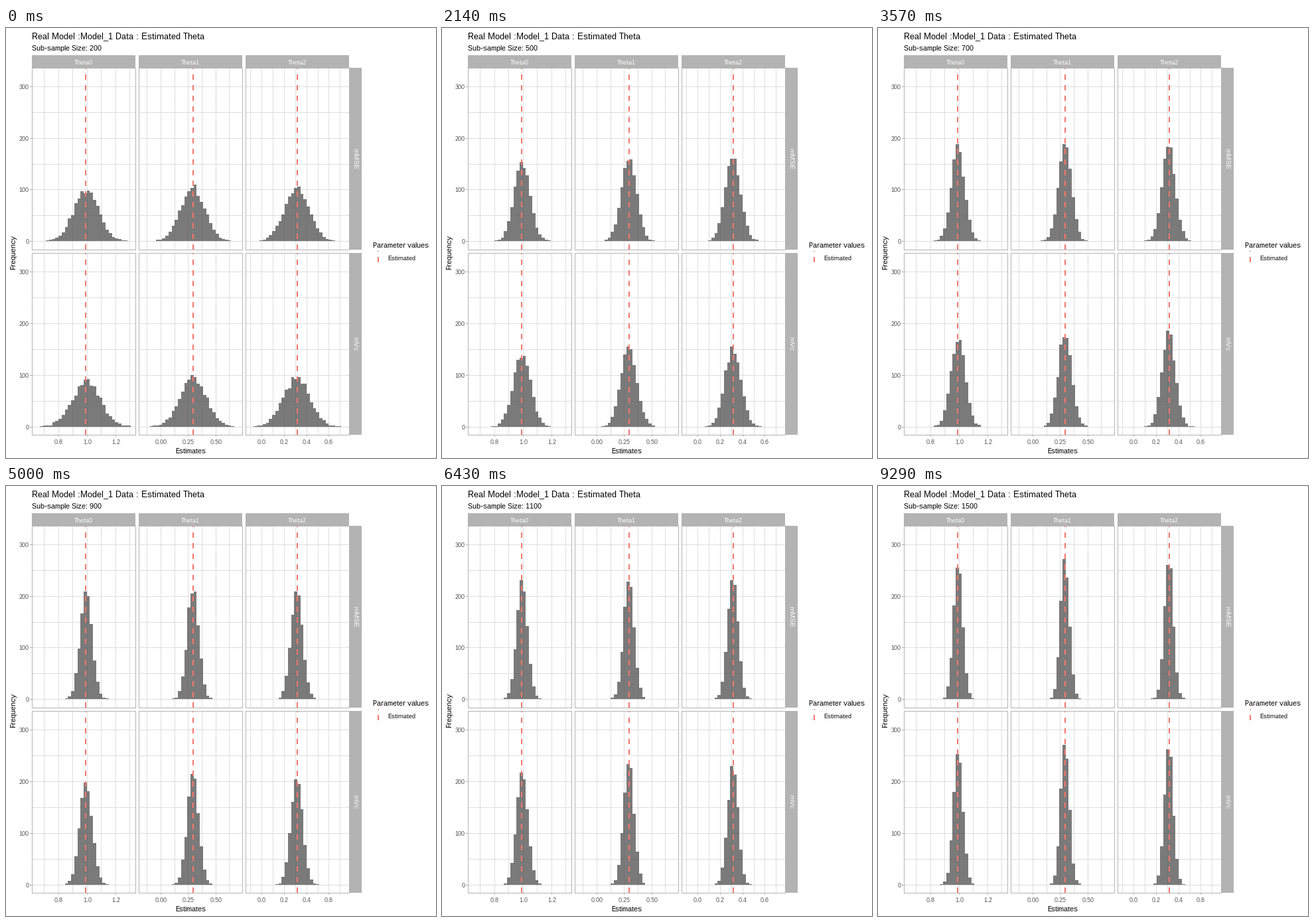
A matplotlib script for the animation above (10 s loop, 648 px wide and 648 px high).

```python
import numpy as np
import matplotlib.pyplot as plt
from matplotlib.animation import FuncAnimation
from matplotlib.collections import PolyCollection

W = H = 648
LOOP, STEP = 10000, 50          # ms
FRAMES = LOOP // STEP
STAGES = 14                     # sample sizes 200, 300 ... 1500

plt.rcParams.update({
    "font.family": "Liberation Sans",
    "text.hinting": "native",   # whole-pixel glyphs, as on a screen device
    "text.hinting_factor": 1,
})
STRIP, GRID, BAR, DASH = "#B3B3B3", "#DEDEDE", "#595959", "#F8766D"
TICK_TEXT = "#4D4D4D"

COLS = [39, 200, 361]           # left edge of each panel
ROWS = [60, 339]                # top edge of each panel
PW, PH = 157, 275
ZERO = [321.6, 601.05]          # y of count 0 in each row
PX = 0.777                      # pixels per count
VLINE = [119, 281, 438]
X_AXES = [                      # first line, spacing, lines, labels
    (57.5, 21.5, 7, ["0.8", "1.0", "1.2"]),
    (212.9, 20.65, 7, ["0.00", "0.25", "0.50"]),
    (368.9, 16.86, 9, ["0.0", "0.2", "0.4", "0.6"]),
]

BINS = np.arange(30)
BIN_W = 4.727
CENTRE = [15.3, 15.3, 14.33]                # mean, in bins, per column
SPREAD = [[1.48, 1.44, 1.46], [1.54, 1.43, 1.43]]   # sd, in bins, at size 1500
SHRINK = [0.49, 0.54]                       # sd ~ size ** -shrink, per row

fig = plt.figure(figsize=(W / 72, H / 72), dpi=72, facecolor="white")
ax = fig.add_axes([0, 0, 1, 1])
ax.set_xlim(0, W)
ax.set_ylim(H, 0)
ax.axis("off")


def counts(row, col, size):
    """1000 estimates binned: a bell that narrows with size, slightly ragged."""
    sd = SPREAD[row][col] * (1500 / size) ** SHRINK[row]
    z = (BINS - CENTRE[col]) / sd
    bell = 1000 * np.exp(-z * z / 2) / (sd * np.sqrt(2 * np.pi))
    rng = np.random.default_rng(size + 3 * row + col)
    ragged = bell + 0.35 * np.sqrt(bell) * rng.standard_normal(BINS.size)
    return np.round(np.clip(ragged, 0, None))


def rect(x, y, w, h):
    return [(x, y), (x + w, y), (x + w, y + h), (x, y + h)]


def bar_verts(row, col, size):
    edges = np.round(COLS[col] + 7.1 + BIN_W * np.arange(BINS.size + 1))
    base = int(ZERO[row])
    verts = []
    for a, b, n in zip(edges, edges[1:], counts(row, col, size)):
        if n > 0:
            h = max(1, round(n * PX))
            verts.append(rect(a, base - h, b - a, h))
    return verts


def fill(verts, color, z, alpha=None):
    coll = PolyCollection(verts, facecolors=color, linewidths=0, alpha=alpha,
                          antialiaseds=False, zorder=z)
    ax.add_collection(coll, autolim=False)
    return coll


def label(x, y, s, size, color="black", ha="left", va="baseline", rot=0):
    return ax.text(x, y, s, fontsize=size, color=color, ha=ha, va=va,
                   rotation=rot, zorder=6)


def dashes(x, top, bottom):
    """Vertical dashed line drawn upwards from the bottom."""
    return [rect(x, max(top, y - 8), 2, y - max(top, y - 8))
            for y in range(bottom, top, -16)]


def outline(x, y):
    return [rect(x, y, PW, 1), rect(x, y + PH - 1, PW, 1),
            rect(x, y, 1, PH), rect(x + PW - 1, y, 1, PH)]


grid, frame, dash = [], [], dashes(560, 336, 353)

for r, top in enumerate(ROWS):
    for c, left in enumerate(COLS):
        first, gap, lines, _ = X_AXES[c]
        grid += [rect(int(first + i * gap), top, 1, PH) for i in range(lines)]
        grid += [rect(left, int(ZERO[r] - i * 50 * PX), PW, 1) for i in range(7)]
        dash += dashes(VLINE[c], top, top + PH - 1)
        frame += outline(left, top)
    frame.append(rect(517, top, 19, PH - 1))
    for v in range(0, 301, 100):
        y = int(ZERO[r] - v * PX)
        frame.append(rect(36, y, 3, 1))
        label(34.5, y + 4, str(v), 9, TICK_TEXT, "right")
    label(525.5, top + 137, ["mMSE", "mVc"][r], 10, "white",
          "center", "center", -90)

for c, (first, gap, _, names) in enumerate(X_AXES):
    frame.append(rect(COLS[c], 41, PW - 1, 20))
    label(COLS[c] + 78, 55, f"Theta{c}", 9, "white", "center")
    for i, name in enumerate(names):
        x = int(first + (2 * i + 1) * gap)
        frame.append(rect(x, 614, 1, 2))
        label(x + 0.5, 627, name, 9, TICK_TEXT, "center")

fill(grid, GRID, 1)
fill(dash, DASH, 4)
fill(frame, STRIP, 5)
bars = fill([], BAR, 3, alpha=0.8)

label(39, 16.5, "Real Model :Model_1 Data : Estimated Theta", 13)
subtitle = label(39, 34, "", 11)
label(278, 641, "Estimates", 11, ha="center")
label(11.5, 338, "Frequency", 11, ha="center", va="center", rot=90)
label(553, 331, "Parameter values", 11)
label(575, 350, "Estimated", 9)


def draw(i):
    stage = (STAGES * (i + 1) - 1) // FRAMES
    size = 200 + 100 * stage
    subtitle.set_text(f"Sub-sample Size: {size}")
    bars.set_verts([v for r in range(2) for c in range(3)
                    for v in bar_verts(r, c, size)])
    return [subtitle, bars]


anim = FuncAnimation(fig, draw, frames=FRAMES, interval=STEP,
                     init_func=lambda: draw(0), repeat=True, repeat_delay=0,
                     blit=False)
plt.show()
```
